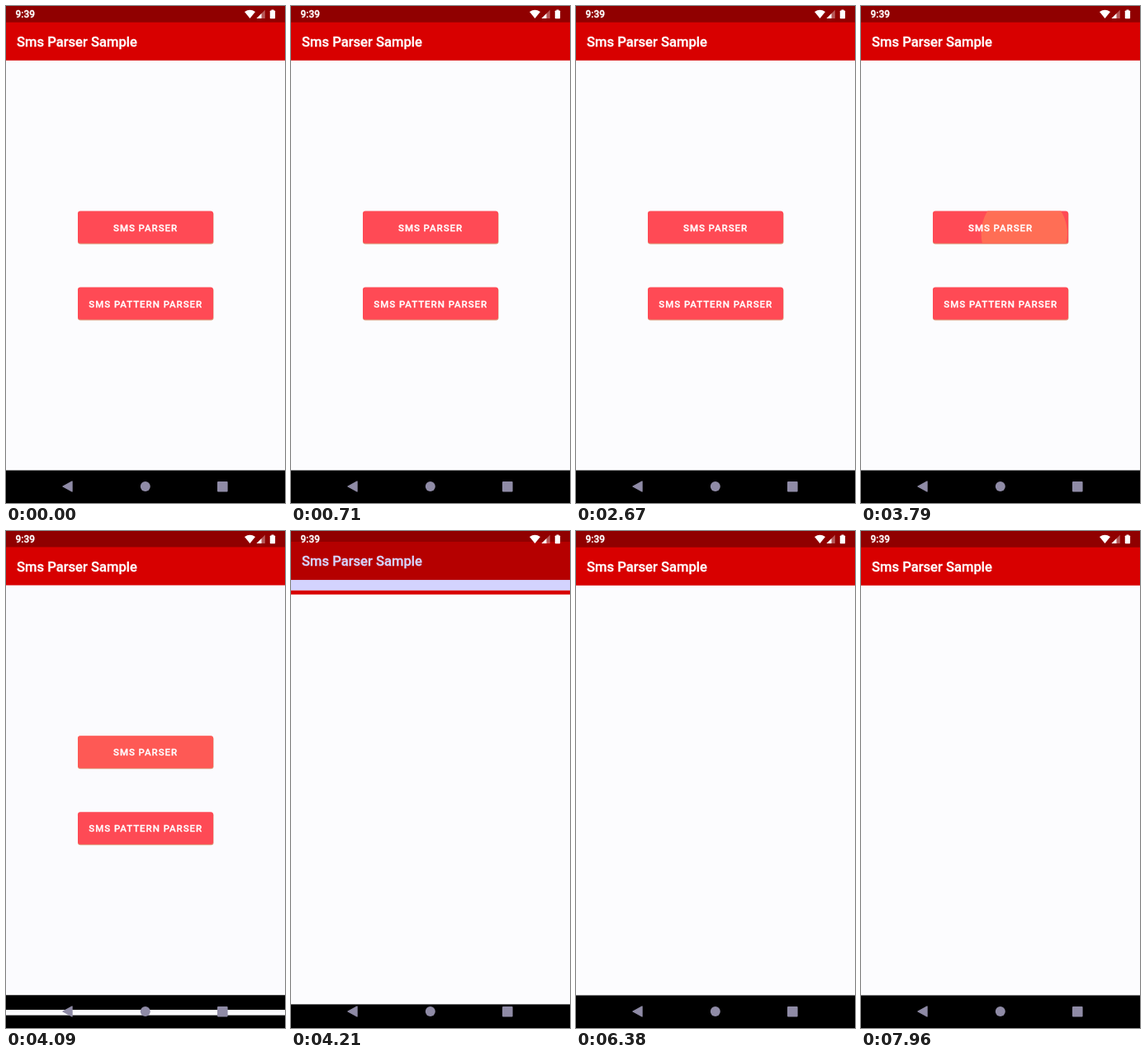
Write an HTML page with a canvas that moves like this. It is 338 by 600 pixels and loops after 8000 ms.

```html
<!DOCTYPE html>
<html lang="en">
<head>
<meta charset="utf-8">
<title>Sms Parser Sample</title>
<style>
html, body { margin: 0; width: 100%; height: 100%; overflow: hidden; background: #000; }
canvas { display: block; width: 338px; height: 600px; }
</style>
</head>
<body>
<canvas id="stage"></canvas>
<script>
const W = 338, H = 600, LOOP = 8000;
const canvas = document.getElementById('stage');
const ctx = canvas.getContext('2d');
const dpr = window.devicePixelRatio || 1;
canvas.width = W * dpr;
canvas.height = H * dpr;

const TAP = 3780, RIPPLE = 225, FADE = 150;
const OPEN = 4052, SLIDE = 425;
const STATUS = 19.7, BAR = 65.75, NAV = 560.55;
const BUTTONS = [
  { y: 247.6, label: 'SMS PARSER', x: 130 },
  { y: 339.6, label: 'SMS PATTERN PARSER', x: 100.3 }
];
const BX = 87, BW = 164, BH = 39;

const clamp = v => Math.max(0, Math.min(1, v));
const mix = (a, b, k) => a + (b - a) * k;
const cubic = (a, b, c, d, s) => {
  const r = 1 - s;
  return r * r * r * a + 3 * r * r * s * b + 3 * r * s * s * c + s * s * s * d;
};

// Easing along one Bezier segment: find s for x, return y
function bezier(px, py, x) {
  let lo = 0, hi = 1;
  for (let i = 0; i < 30; i++) {
    const s = (lo + hi) / 2;
    if (cubic(...px, s) < x) lo = s; else hi = s;
  }
  return cubic(...py, lo);
}
const fastOutSlowIn = x => x >= 1 ? 1 : bezier([0, 0.4, 0.2, 1], [0, 0, 1, 1], x);
const extraSlowIn = x => x >= 1 ? 1 : x < 1 / 6
  ? bezier([0, 0.05, 0.13333, 1 / 6], [0, 0, 0.06, 0.4], x)
  : bezier([1 / 6, 0.20833, 0.25, 1], [0.4, 0.82, 1, 1], x);

function rect(x, y, w, h, color) {
  ctx.fillStyle = color;
  ctx.fillRect(x, y, w, h);
}

// A hairline stroke gives the slightly heavier phone rendering
function text(str, x, y, size, spacing = 0) {
  ctx.font = `500 ${size}px Roboto, sans-serif`;
  ctx.letterSpacing = spacing + 'px';
  ctx.fillStyle = ctx.strokeStyle = '#fff';
  ctx.lineWidth = 0.3;
  ctx.lineJoin = 'round';
  ctx.fillText(str, x, y);
  ctx.strokeText(str, x, y);
}

function poly(points, color) {
  ctx.beginPath();
  points.forEach(p => ctx.lineTo(p[0], p[1]));
  ctx.closePath();
  ctx.fillStyle = color;
  ctx.fill();
}

function rounded(x, y, w, h, r) {
  ctx.beginPath();
  ctx.roundRect(x, y, w, h, r);
}

function drawWindow() {
  rect(0, 0, W, H, '#fcfcfe');
  rect(0, 0, W, BAR, '#d80000');
  rect(0, 0, W, STATUS, '#900000');
  rect(0, NAV, W, 60, '#000');
  text('Sms Parser Sample', 13, 49, 16.6);
}

function drawRipple(t) {
  const age = t - TAP;
  if (age < 0 || age > RIPPLE + FADE) return;
  const k = 1 - Math.pow(1 - clamp(age / RIPPLE), 2);
  ctx.save();
  rounded(BX, BUTTONS[0].y, BW, BH, 3);
  ctx.clip();
  ctx.globalAlpha = 1 - clamp((age - RIPPLE) / FADE);
  ctx.beginPath();
  ctx.arc(mix(200.8, 169, k), mix(275.5, 267.5, k), mix(48.6, 86, k), 0, Math.PI * 2);
  ctx.fillStyle = '#ff6e55';
  ctx.fill();
  ctx.restore();
}

function drawMenu(t) {
  drawWindow();
  BUTTONS.forEach((b, i) => {
    rounded(BX, b.y + 1, BW + 0.5, BH, 3);
    ctx.fillStyle = '#dc9a78';
    ctx.fill();
    rounded(BX, b.y, BW, BH, 3);
    ctx.fillStyle = '#ff4a55';
    ctx.fill();
    if (i === 0) drawRipple(t);
    text(b.label, b.x, b.y + 23.9, 11.5, 0.95);
  });
}

function drawSystemBars() {
  text('9:39', 11.6, 14.4, 11.9);

  // wifi
  ctx.beginPath();
  ctx.moveTo(295.5, 15);
  ctx.lineTo(289, 7);
  ctx.quadraticCurveTo(295.5, 2.4, 302, 7);
  ctx.closePath();
  ctx.fillStyle = '#fff';
  ctx.fill();

  // signal
  poly([[303.5, 15], [313.8, 4.8], [313.8, 15]], 'rgba(255,255,255,0.35)');
  poly([[303.5, 15], [309.5, 9], [309.5, 15]], '#fff');

  // battery
  rect(321.5, 4.5, 3, 2, '#fff');
  rounded(319.8, 5.5, 6.3, 9.7, 0.8);
  ctx.fill();

  const gray = '#8f8ba6';
  poly([[69, 580], [80, 574], [80, 586]], gray);
  ctx.strokeStyle = gray;
  ctx.lineWidth = 1.4;
  ctx.stroke();
  ctx.beginPath();
  ctx.arc(168.8, 580, 6, 0, Math.PI * 2);
  ctx.fill();
  rounded(256, 574, 12.6, 12.6, 1);
  ctx.fill();
}

// Lavender tint over the leaving screen
function dim(amount) {
  ctx.globalCompositeOperation = 'multiply';
  rect(0, STATUS, W, H, `rgba(182,182,255,${amount})`);
}

function draw(t) {
  ctx.setTransform(dpr, 0, 0, dpr, 0, 0);
  rect(0, 0, W, H, '#000');
  const x = clamp((t - OPEN) / SLIDE);
  const slide = fastOutSlowIn(x);

  if (x < 1) {
    ctx.save();
    ctx.translate(0, -12 * slide);
    drawMenu(t);
    dim(slide);
    ctx.restore();
  }
  if (x > 0) {
    ctx.save();
    ctx.translate(0, 24.6 * (1 - slide));
    ctx.beginPath();
    ctx.rect(0, H * (1 - extraSlowIn(x)), W, H);
    ctx.clip();
    drawWindow();
    ctx.restore();
  }
  drawSystemBars();
}

const start = performance.now();
function tick() {
  draw((performance.now() - start) % LOOP);
  requestAnimationFrame(tick);
}
tick();
</script>
</body>
</html>
```
